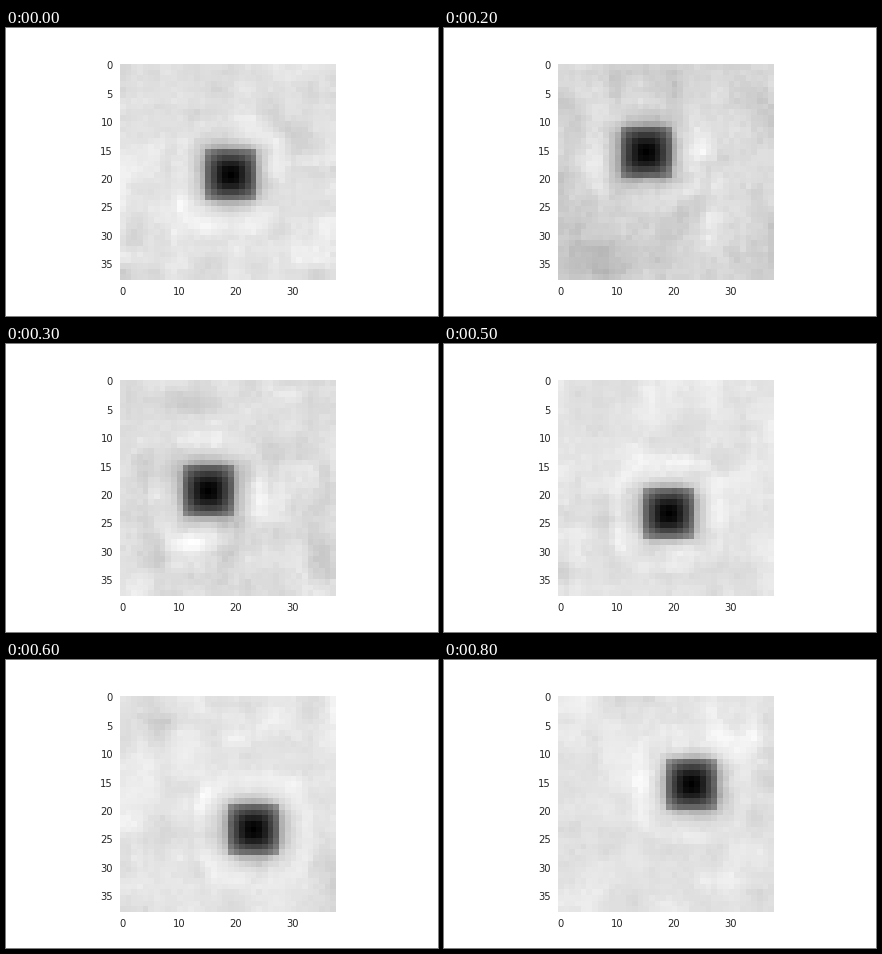
A matplotlib script for the animation above (900 ms loop, 432x288 px).

```python
import numpy as np
import matplotlib.pyplot as plt
from matplotlib.animation import FuncAnimation
from matplotlib.transforms import Affine2D

N = 38          # cells per side
STEP = 4        # cells the spot moves each time
RADIUS = 7.5    # reach of the dark spot
ROWS, COLS = np.mgrid[:N, :N]


def spiral():
    """Walk outwards from the middle: up, left, down, right, up."""
    pos, heading = 19 + 19j, -1j
    path = [pos]
    for run in (1, 1, 2, 2, 2):
        for _ in range(run):
            pos += STEP * heading
            path.append(pos)
        heading *= -1j
    return path


def box(x, y, w, h):
    return ((abs(COLS - x) <= w) & (abs(ROWS - y) <= h)).astype(float)


def spot(x, y):
    """Rounded square with a stepped edge and a faint bright rim."""
    dist = (abs(COLS - x) ** 3 + abs(ROWS - y) ** 3) ** (1 / 3)
    dome = .5 + .5 * np.cos(np.pi * np.minimum(dist / RADIUS, 1))
    rim = np.sin(np.pi * np.clip((dist - RADIUS) / 3.5, 0, 1))
    return .8 * dome + .2 * box(x, y, 4, 4) - .04 * rim


def noise(rng):
    """Overlapping soft rectangles plus a little grain, unit deviation."""
    out = np.zeros((N, N))
    for _ in range(400):
        x, y = rng.integers(-3, N + 3, 2)
        w, h = rng.integers(1, 5, 2)
        out += rng.normal() * (box(x, y, w, h) + box(x, y, w - 1, h - 1))
    out = (out - out.mean()) / out.std()
    return out + .25 * rng.normal(size=(N, N))


def field(step, pos):
    rng = np.random.default_rng(40 + step)
    level = np.interp(step, [0, 1, 2, 4], [.88, .83, .83, .89])
    ground = level + .2 * (1 - level) * noise(rng)
    return np.clip(ground * (1 - spot(pos.real, pos.imag)), 0, 1)


plt.rcParams.update({
    "font.family": "DejaVu Sans", "font.size": 10,
    "xtick.color": ".15", "ytick.color": ".15",
})
fields = [field(step, pos) for step, pos in enumerate(spiral())]

fig = plt.figure(figsize=(6, 4), dpi=72, facecolor="white")
ax = fig.add_axes([114 / 432, 36 / 288, 216 / 432, 216 / 288])
image = ax.imshow(fields[0], cmap="gray", vmin=0, vmax=1,
                  interpolation="nearest")
ax.set_xticks(range(0, N, 10))
ax.set_yticks(range(0, N, 5))
ax.tick_params(length=0, pad=7)
ax.spines[:].set_visible(False)

for label in ax.get_xticklabels():
    label.set_transform(label.get_transform() + Affine2D().translate(-.5, 0))
for label in ax.get_yticklabels():
    label.set_va("center")
    label.set_transform(label.get_transform() + Affine2D().translate(0, .6))


def update(step):
    image.set_data(fields[step])
    return [image]


anim = FuncAnimation(fig, update, frames=len(fields), interval=100,
                     repeat=True, repeat_delay=0, blit=False)
plt.show()
```
